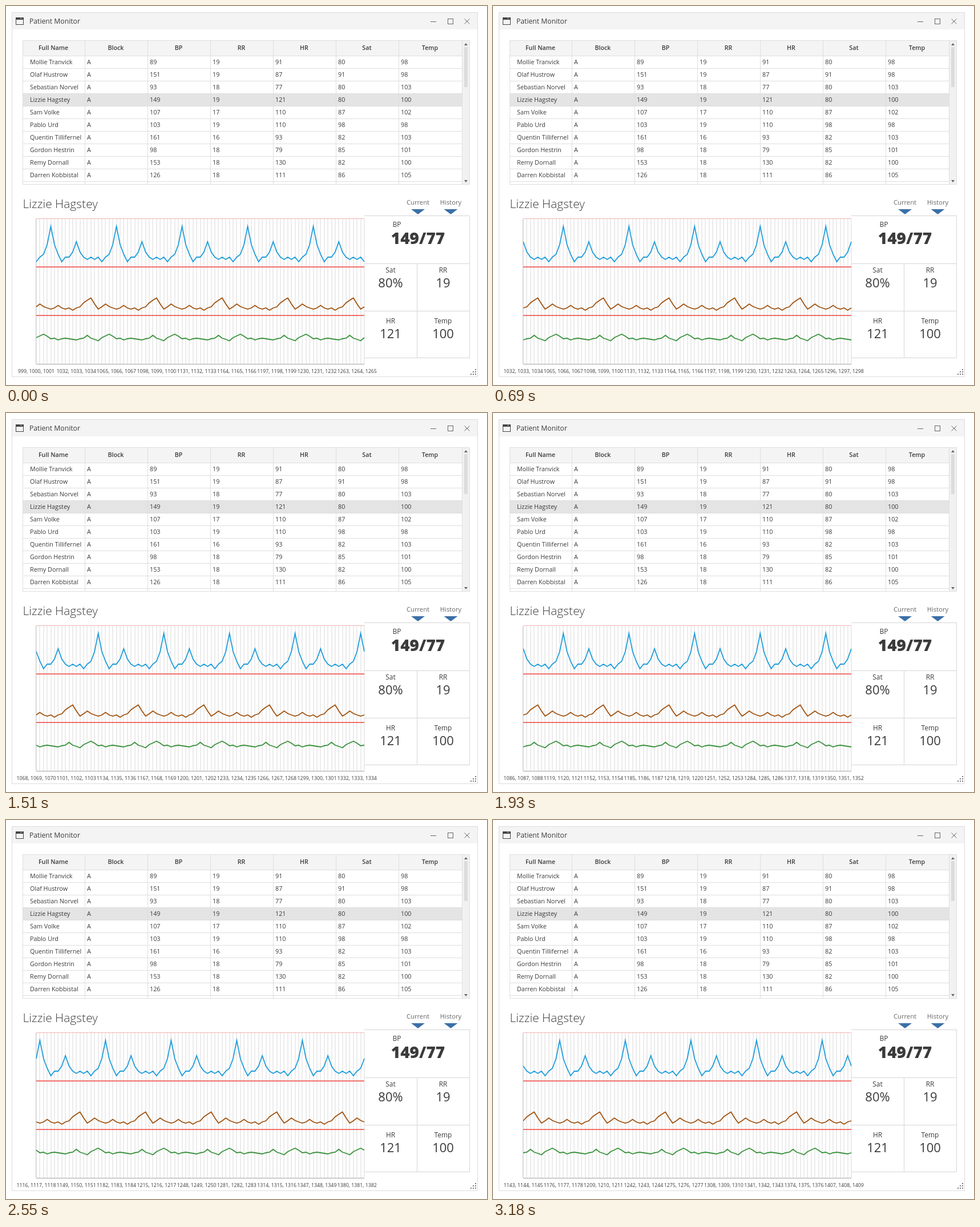
These frames come from a looping animation (843 px wide and 664 px high, 3250 ms). An HTML page with a canvas:

```html
<!DOCTYPE html>
<html lang="en">
<head>
<meta charset="utf-8">
<title>Patient Monitor</title>
<style>
  html, body { margin: 0; width: 100%; height: 100%; overflow: hidden; background: #fff; }
  canvas { display: block; width: 843px; height: 664px; }
</style>
</head>
<body>
<canvas id="stage" width="843" height="664"></canvas>
<script>
const ctx = document.getElementById('stage').getContext('2d');
const LOOP = 3250;
const FAMILY = '"Open Sans", "Noto Sans", sans-serif';
const INK = '#3b3b3b';
const GRID = '#dedede';

const HEADERS = ['Full Name', 'Block', 'BP', 'RR', 'HR', 'Sat', 'Temp'];
const COLS = [29, 138, 248, 358, 468, 578, 688, 799];
const PATIENTS = [
  ['Mollie Tranvick', 89, 19, 91, 80, 98],
  ['Olaf Hustrow', 151, 19, 87, 91, 98],
  ['Sebastian Norvel', 93, 18, 77, 80, 103],
  ['Lizzie Hagstey', 149, 19, 121, 80, 100],
  ['Sam Volke', 107, 17, 110, 87, 102],
  ['Pablo Urd', 103, 19, 110, 98, 98],
  ['Quentin Tillifernel', 161, 16, 93, 82, 103],
  ['Gordon Hestrin', 98, 18, 79, 85, 101],
  ['Remy Dornall', 153, 18, 130, 82, 100],
  ['Darren Kobbistal', 126, 18, 111, 86, 105]
];
const SELECTED = 3;

// One 18-point cycle per trace, as stage heights
const TRACES = [
  ['#1f9ddb', [448, 440, 435, 418, 386, 418, 435, 448, 440, 440, 431, 413, 431, 440, 444, 440, 444, 440]],
  ['#a0520f', [527, 522, 526.5, 529, 531, 529, 524.5, 529, 531, 529, 533, 529, 527, 520, 515.5, 511.5, 522, 531]],
  ['#3a923d', [581, 578, 575, 578.5, 583, 582, 585, 583, 582, 583, 584, 585, 583, 582, 577, 582, 584, 586.5]]
];

// Bursts of updates: start time, number of updates, first offset, update that comes 10 ms early
const BURSTS = [
  [70, 8, 1, 4], [620, 7, 10, 9], [1170, 8, 18, 4],
  [1720, 8, 26, 4], [2340, 8, 36, 9], [2900, 5, 44, 9]
];

const CHART = { left: 53, right: 628, top: 373, bottom: 627, points: 90 };
const pointX = k => CHART.left + k * (CHART.right - CHART.left) / CHART.points;

function offsetAt(ms) {
  let offset = 0;
  for (const [start, count, first, early] of BURSTS) {
    for (let i = 0; i < count; i++) {
      if (ms >= start + 70 * i - (i >= early ? 10 : 0)) offset = first + i;
    }
  }
  return offset;
}

function rect(x, y, w, h, color) {
  ctx.fillStyle = color;
  ctx.fillRect(x, y, w, h);
}

function frame(x, y, w, h, color) {
  ctx.strokeStyle = color;
  ctx.lineWidth = 1;
  ctx.strokeRect(x + 0.5, y + 0.5, w - 1, h - 1);
}

function path(points, color, width) {
  ctx.beginPath();
  points.forEach(([x, y]) => ctx.lineTo(x, y));
  ctx.strokeStyle = color;
  ctx.lineWidth = width;
  ctx.stroke();
}

function triangle(x, y, half, height, color) {
  ctx.beginPath();
  ctx.moveTo(x - half, y);
  ctx.lineTo(x + half, y);
  ctx.lineTo(x, y + height);
  ctx.fillStyle = color;
  ctx.fill();
}

function text(str, x, y, size, align = 'left', weight = 400, color = INK) {
  ctx.font = `${weight} ${size}px ${FAMILY}`;
  ctx.textAlign = align;
  ctx.fillStyle = color;
  ctx.fillText(str, x, y);
}

function drawWindow() {
  rect(10, 11, 817, 30, '#f4f4f4');
  frame(10, 11, 817, 639, '#dcdcdc');

  frame(17, 20, 14, 13, '#444');
  rect(17, 20, 14, 4, '#444');
  rect(25, 21, 1, 1, '#fff');
  rect(27, 21, 1, 1, '#fff');
  text('Patient Monitor', 41, 30.5, 12.2);

  rect(744, 27, 10, 1, '#666');
  frame(774, 22, 10, 10, '#666');
  path([[803.5, 22.5], [812.5, 31.5]], '#666', 1);
  path([[812.5, 22.5], [803.5, 31.5]], '#666', 1);

  for (let row = 0; row < 3; row++) {
    for (let col = 2 - row; col < 3; col++) {
      rect(814 + col * 4, 636 + row * 4, 2, 2, '#777');
    }
  }
}

function drawTable() {
  rect(29, 60, 784, 27, '#f4f4f4');
  rect(29, 153, 770, 23, '#e4e4e4');

  for (let i = 0; i <= 10; i++) rect(29, 87 + i * 22, 770, 1, GRID);
  for (const x of COLS) rect(x, 60, 1, 252, GRID);

  HEADERS.forEach((name, i) => {
    text(name, (COLS[i] + COLS[i + 1]) / 2 - 0.5, 77, 10.7, 'center', 600);
  });
  PATIENTS.forEach(([name, ...vitals], row) => {
    const y = 102 + row * 22;
    text(name, 42, y, 10.8);
    ['A', ...vitals].forEach((value, i) => text(value, COLS[i + 1] + 4, y, 10.8));
  });

  rect(800, 60, 12, 252, '#f1f1f1');
  rect(803, 72, 6, 70, '#dcdcdc');
  triangle(806, 69, 3, -4, '#666');
  triangle(806, 305, 3, 4, '#666');
  frame(29, 60, 784, 253, GRID);
}

function drawVitals() {
  text(PATIENTS[SELECTED][0], 29.5, 354, 21, 'left', 300);
  text('Current', 722, 348, 11.2, 'center', 400, '#666');
  text('History', 779.5, 348, 11.2, 'center', 400, '#666');
  triangle(722, 356, 12, 9, '#3c70a8');
  triangle(779.5, 356, 12, 9, '#3c70a8');

  for (const y of [367, 451, 534, 616]) rect(628, y, 185, 1, '#d6d6d6');
  rect(812, 367, 1, 250, '#d6d6d6');
  rect(720, 451, 1, 166, '#d6d6d6');

  text('BP', 685, 386.5, 12, 'center');
  text('149/77', 722, 417, 28, 'center', 800);
  const cells = [
    ['Sat', '80%', 674, 467], ['RR', '19', 766, 467],
    ['HR', '121', 674, 555.5], ['Temp', '100', 766, 555.5]
  ];
  for (const [label, value, x, y] of cells) {
    text(label, x, y, 11.9, 'center');
    text(value, x, y + 26, 22, 'center');
  }
}

function drawChart(offset) {
  const { left, right, top, bottom, points } = CHART;
  const width = right - left;

  for (let k = 0; k <= points; k++) {
    rect(Math.round(pointX(k)) - 0.5, top, 1, bottom - top, '#dadada');
  }
  rect(left, 372, width, 1, '#f3b5b0');
  for (const y of [457, 542]) {
    rect(left, y - 0.5, width, 1.5, '#f0443e');
  }
  rect(52, top, 1, bottom - top, '#c8c8c8');
  rect(left, bottom, width, 1, '#a4a4a4');

  ctx.save();
  ctx.beginPath();
  ctx.rect(left - 0.5, top, width + 1, bottom - top);
  ctx.clip();
  for (const [color, cycle] of TRACES) {
    const line = [];
    for (let k = 0; k <= points; k++) {
      line.push([pointX(k), cycle[(k + offset) % cycle.length]]);
    }
    path(line, color, 1.8);
  }
  ctx.restore();

  for (let k = 0; k < points; k += 11) {
    const n = 999 + 3 * (k + offset);
    text(`${n}, ${n + 1}, ${n + 2}`, pointX(k), 643, 8.75, 'center');
  }
}

function draw(now) {
  rect(0, 0, 843, 664, '#fff');
  drawWindow();
  drawTable();
  drawVitals();
  drawChart(offsetAt(now % LOOP));
}

let began;
function tick(now) {
  began ??= now;
  draw(Math.max(0, now - began));
  requestAnimationFrame(tick);
}
draw(0);
requestAnimationFrame(tick);
</script>
</body>
</html>
```
